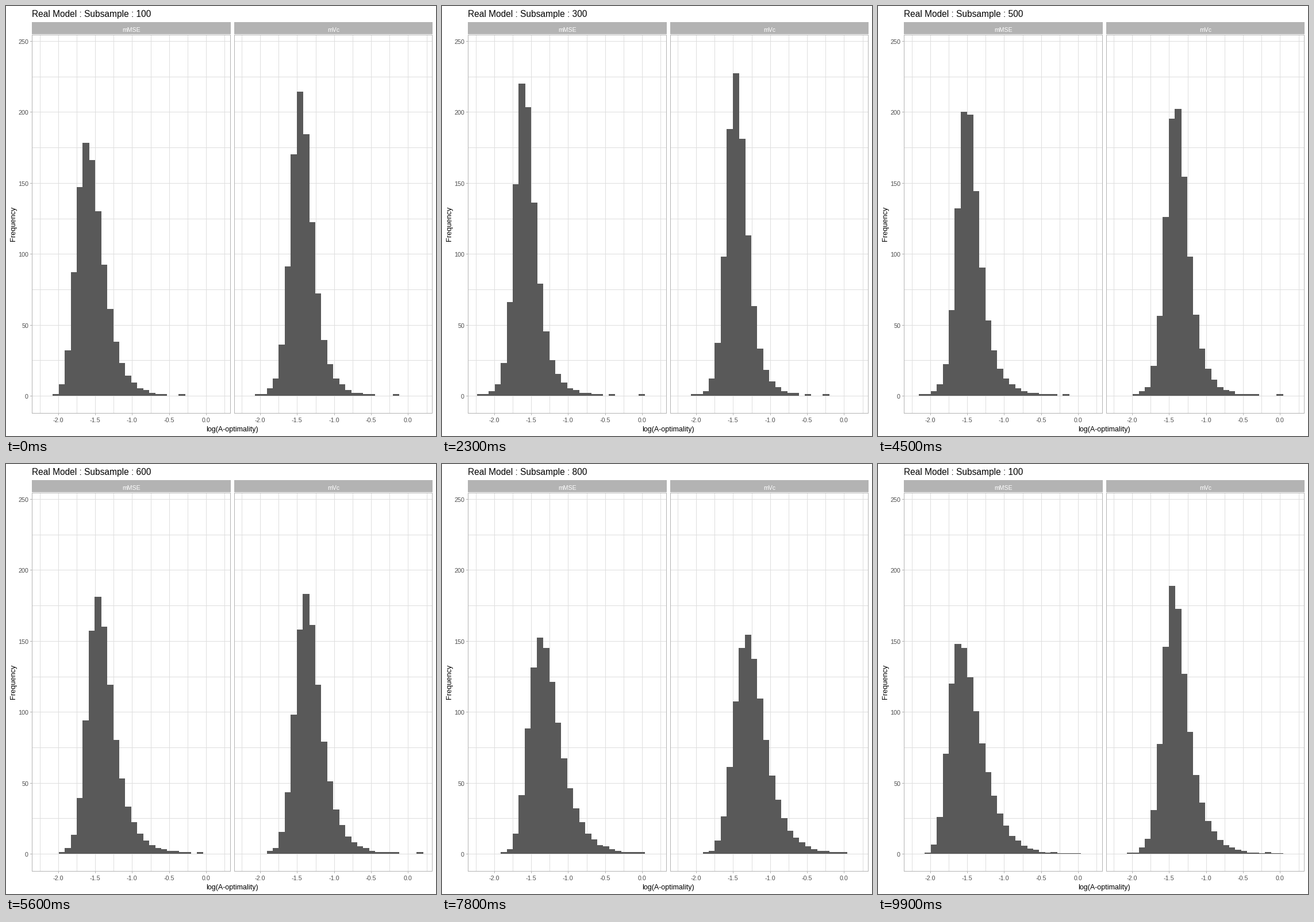
A matplotlib script for the animation above (10000 ms loop, 748 by 748 pixels).

```python
import matplotlib.pyplot as plt
import numpy as np
from matplotlib.animation import FuncAnimation
from matplotlib.patches import Rectangle

SIZE, DPI = 748, 100
PX = 72 / DPI
FRAMES, INTERVAL = 100, 100
BINS, BIN_X, BIN_W = 30, 61.0, 10.428
BASE, UNIT_Y = 678, 2.468
ZERO_X, UNIT_X = 348.0, 128.6
SHIFT = 351.35
DARK, GRID, FRAME, LABEL = "#595959", "#dedede", "#b3b3b3", "#4d4d4d"

SIZES = np.arange(100, 1000, 100)
STARTS = np.array([6, 18, 30, 41, 52, 63, 74, 85, 96])
STEPS = np.where(STARTS < 30, 6, 5)

plt.rcParams["font.family"] = "Liberation Sans"

# Normal scores of 1000 evenly spaced ranks.
grid = np.linspace(-4, 4, 4001)
cdf = np.cumsum(np.exp(-grid ** 2 / 2))
Z = np.interp((np.arange(1000) + 0.5) / 1000, cdf / cdf[-1], grid)


def skewed_hist(median, scale, skew, tail):
    """Bin counts of a g-and-h distribution, in units of one bin."""
    x = median + scale * np.expm1(skew * Z) / skew * np.exp(tail * Z ** 2 / 2)
    return np.histogram(x, np.arange(BINS + 1))[0]


def states(*curves):
    """One histogram per subsample size, from curves through a few sizes."""
    keys = [100, 200, 300, 500, 700, 900]
    params = [np.interp(SIZES, keys, c) for c in curves]
    return np.array([skewed_hist(*p) for p in zip(*params)])


MMSE = states([8.27, 7.87, 8.13, 9.35, 10.78, 12.16],
              [2.31, 1.63, 1.79, 1.94, 2.62, 2.85],
              [0.30, 0.24, 0.28, 0.30, 0.39, 0.28],
              [0.03, 0.15, 0.13, 0.13, 0.03, 0.04])
MVC = states([9.86, 9.45, 9.70, 10.44, 11.53, 12.41],
             [1.87, 1.73, 1.76, 1.93, 2.55, 2.79],
             [0.22, 0.20, 0.23, 0.25, 0.35, 0.26],
             [0.10, 0.10, 0.10, 0.10, 0.05, 0.05])

fig = plt.figure(figsize=(SIZE / DPI, SIZE / DPI), dpi=DPI, facecolor="white")
ax = fig.add_axes([0, 0, 1, 1])
ax.set(xlim=(0, SIZE), ylim=(SIZE, 0))
ax.axis("off")


def box(x, y, w, h, color, z=1):
    return ax.add_patch(Rectangle((x, y), w, h, fc=color, lw=0, zorder=z))


def text(x, y, s, size, color="black", ha="center", va="baseline", **kw):
    return ax.text(x, y, s, fontsize=size * PX, color=color, ha=ha, va=va, **kw)


def count_y(c):
    return round(BASE - UNIT_Y * c)


def panel(name, left, right, shift):
    width = right - left + 1
    box(left, 28, width, 21, FRAME)
    text(left + width / 2, 44.5, name, 10.5, "white")
    for c in range(0, 251, 25):
        box(left, count_y(c), width, 1, GRID)
    for v in np.arange(-2.25, 0.3, 0.25):
        x = round(ZERO_X + shift + UNIT_X * v)
        box(x, 50, 1, 658, GRID)
        if v % 0.5 == 0:
            box(x, 709, 1, 3, FRAME)
            text(x, 724, f"{v:.1f}", 10.7, LABEL)
    for y in (50, 708):
        box(left, y, width, 1, FRAME, 4)
    for x in (left, right):
        box(x, 50, 1, 659, FRAME, 4)
    edges = np.floor(BIN_X + shift + BIN_W * np.arange(BINS + 1))
    return [box(a, BASE, b - a + 1, 0, DARK, 3)
            for a, b in zip(edges, edges[1:])]


panels = [(panel("mMSE", 45, 390, 0), MMSE),
          (panel("mVc", 397, 741, SHIFT), MVC)]

for c in range(0, 251, 50):
    box(42, count_y(c), 3, 1, FRAME)
    text(39, count_y(c) + 5, str(c), 10.8, LABEL, ha="right")

title = text(45, 19, "", 15.5, ha="left")
text(393, 740, "log(A-optimality)", 12.5)
text(13.5, 379, "Frequency", 12.7, rotation=90, va="center")


def update(n):
    i = int(np.sum(STARTS <= n))
    old, new, t = 0, 0, 1.0
    if i:
        old, new = i - 1, i % len(STARTS)
        t = min(1.0, (n - STARTS[old] + 1) / STEPS[old])
    for bars, hists in panels:
        counts = hists[old] * (1 - t) + hists[new] * t
        for bar, top in zip(bars, np.floor(BASE - UNIT_Y * counts)):
            bar.set_height(top - BASE)
    nearest = new if t > 0.5 else old
    title.set_text(f"Real Model : Subsample : {SIZES[nearest]}")
    return [title]


anim = FuncAnimation(fig, update, frames=FRAMES, interval=INTERVAL,
                     repeat=True, repeat_delay=0, blit=False)
plt.show()
```
